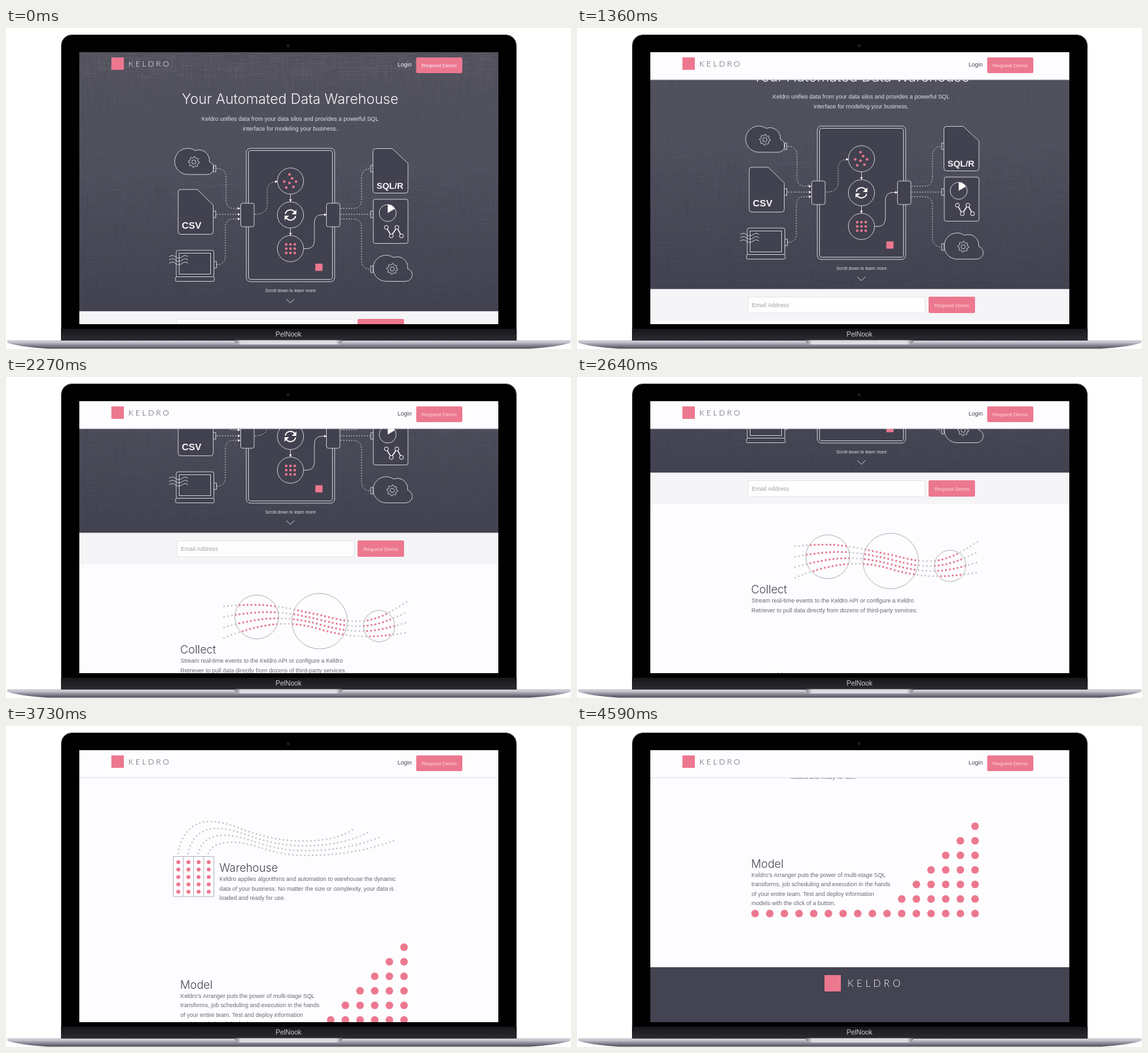
An HTML page that plays this animation: 863 px wide and 491 px high, repeating every 5.59 s.

```html
<!DOCTYPE html>
<html lang="en">
<head>
<meta charset="utf-8">
<title>Keldro scroll tour</title>
<style>
html, body { margin: 0; width: 100%; height: 100%; overflow: hidden; background: #fff; }
svg { display: block; width: 863px; height: 491px; }
text { font-family: "Liberation Sans", Arial, sans-serif; font-size: 8.9px; fill: #6a6a75; }
.light { font-family: Inter, "Liberation Sans", sans-serif; font-weight: 300; }
.brand { font-family: Lato, "Liberation Sans", sans-serif; font-weight: 300; font-size: 12px; letter-spacing: 3.1px; }
.head { font-size: 17px; fill: #42424f; }
.mid { text-anchor: middle; }
.white text { fill: #f5f5f8; }
.white .soft { fill: #dfdfe5; }
.btn text { font-size: 8px; fill: #fbd9e0; text-anchor: middle; }
.btn rect, .pink { fill: #ec788f; }
.art { fill: none; stroke: #d2d2da; stroke-width: .95; }
.dots { stroke-dasharray: 2 2; }
.dark { fill: #41414f; }
.solid { fill: #fff; stroke: none; }
.flow { fill: none; stroke: #c6c5cb; stroke-width: 2.6; stroke-linecap: round; stroke-dasharray: 0 6; }
.flow.hot { stroke: #ec788f; stroke-width: 3; }
#header text { fill: #4a4a56; }
#header .btn text { fill: #fbd9e0; }
#header.clear text { fill: #f5f5f8; }
#header.clear .bar { display: none; }
</style>
</head>
<body>
<svg viewBox="0 0 863 491">
  <defs>
    <clipPath id="screen"><rect x="112" y="37" width="640" height="416"/></clipPath>
    <clipPath id="lenses">
      <circle cx="383" cy="161" r="34"/><circle cx="479" cy="167.5" r="42.5"/><circle cx="570" cy="175" r="24"/>
    </clipPath>
    <linearGradient id="hero" x2="0" y2="1">
      <stop stop-color="#52525f"/><stop offset=".45" stop-color="#4f4f5d"/><stop offset="1" stop-color="#414150"/>
    </linearGradient>
    <linearGradient id="chin" x2="0" y2="1">
      <stop stop-color="#17171b"/><stop offset="1" stop-color="#2b2b31"/>
    </linearGradient>
    <linearGradient id="metal" x2="0" y2="1">
      <stop stop-color="#a0a0ab"/><stop offset=".12" stop-color="#d4d4dc"/>
      <stop offset=".5" stop-color="#9595a2"/><stop offset="1" stop-color="#4a4a55"/>
    </linearGradient>
    <linearGradient id="notch">
      <stop stop-color="#77777f"/><stop offset=".06" stop-color="#dcdce2"/>
      <stop offset=".94" stop-color="#dcdce2"/><stop offset="1" stop-color="#77777f"/>
    </linearGradient>
    <g id="cloud">
      <path class="dark" d="M278 224A20 20 0 1 1 289 187.500A16 16 0 0 1 310.500 204.500A10 10 0 0 1 308 224Z"/>
      <path id="gear"/><circle cx="287" cy="205" r="3.200"/>
    </g>
    <g id="turn">
      <path d="M426.500 284.500A8.200 8.200 0 0 1 441 281.500" fill="none" stroke="#fff" stroke-width="1.700"/>
      <path class="solid" d="M443.500 278V285H436.500Z"/>
    </g>
    <path id="tip" class="solid" d="M0 0l-4-2v4Z"/>
    <g id="streams"></g>
  </defs>

  <!-- laptop -->
  <rect x="84.500" y="10.500" width="695" height="466" rx="16" stroke="#4b4b50"/>
  <path d="M84 460H780V478H84Z" fill="url(#chin)"/>
  <circle cx="431" cy="27" r="2.500" fill="#1b1b20"/>
  <text class="mid" x="431.500" y="472" style="font-size:10.500px;fill:#c9c9cf">PelNook</text>
  <path d="M2 478H862V481.500Q842 488 800 490.500H64Q22 488 2 481.500Z" fill="url(#metal)"/>
  <path d="M349 477.500H514Q513 484 506 484H357Q350 484 349 477.500Z" fill="url(#notch)"/>

  <g clip-path="url(#screen)">
    <rect x="112" y="37" width="640" height="416" fill="#fdfcfe"/>
    <g id="page">
      <rect x="112" y="37" width="640" height="396.500" fill="url(#hero)"/>
      <g fill="none" stroke-width=".7" stroke-dasharray="1 2">
        <path id="weaveTop" stroke="#b09a8c" stroke-opacity=".4"/>
        <path id="weave" stroke="#a9a9bb" stroke-opacity=".2"/>
        <path id="weaveDark" stroke="#30303d" stroke-opacity=".4"/>
      </g>

      <g class="white mid">
        <text class="light" x="434" y="116" style="font-size:21.500px">Your Automated Data Warehouse</text>
        <text class="soft" x="434" y="142">Keldro unifies data from your data silos and provides a powerful SQL</text>
        <text class="soft" x="434" y="156.500">interface for modeling your business.</text>
        <text class="soft" x="434.500" y="404" style="font-size:6.800px">Scroll down to learn more</text>
      </g>

      <g class="art">
        <path d="M428 414.500l6.300 6 6.300-6"/>
        <use href="#cloud"/><use href="#cloud" x="303" y="163.500"/>
        <path d="M316.500 210h4v10h-4zM316.500 280h4v10h-4zM317.500 357h4v10h-4zM557 210h4v10h-4zM557 280h4v10h-4zM557 364h4v10h-4z"/>
        <path class="dark" d="M267 247H292L316.500 271V311.500a4 4 0 0 1-4 4H267a4 4 0 0 1-4-4V251a4 4 0 0 1 4-4Z"/>
        <path class="dark" d="M564.500 184.500H590L614 207V248.500a4 4 0 0 1-4 4H564.500a4 4 0 0 1-4-4V188.500a4 4 0 0 1 4-4Z"/>
        <rect class="dark" x="561" y="262" width="53" height="67.500" rx="3"/>
        <circle cx="583" cy="283" r="13"/><path class="solid" d="M583 283V270A13 13 0 0 1 594 276.500Z"/>
        <path d="M581 305l7.500 13 8.500-13 7 13" stroke="#fff" stroke-width="1.500"/>
        <g class="dark" stroke="#fff">
          <circle cx="581" cy="305" r="3"/><circle cx="588.500" cy="318" r="3"/>
          <circle cx="597" cy="305" r="3"/><circle cx="604" cy="318" r="3"/>
        </g>
        <rect class="dark" x="260" y="340" width="57.500" height="41" rx="3"/>
        <rect class="dark" x="264.500" y="344.500" width="48" height="32"/>
        <rect class="dark" x="259" y="380.500" width="59" height="7" rx="1.500"/>
        <path d="M249 350q5-4 10 0t10 0 9 0m-29 5q5-4 10 0t10 0 9 0m-29 5q5-4 10 0t10 0 9 0"/>

        <rect x="367" y="184" width="135" height="204" rx="6" fill="#474755"/>
        <rect class="dark" x="370.500" y="187.500" width="128" height="197" rx="3"/>
        <g class="dots">
          <path d="M322 215Q336 215 336 229V263Q336 276 349 276H357M322 285H357M322 362Q335 362 335 348V305Q335 292 348 292H357"/>
          <path d="M380 285Q399 285 399 270V250Q399 235 413 235"/>
          <path d="M511 276H530Q543 276 543 262V230Q543 215 557 215M511 285H557M511 292H530Q543 292 543 306V354Q543 369 557 369"/>
        </g>
        <path d="M434.500 254V266M434.500 306V317M455 337.500H459Q471 337.500 471 325V298Q471 285.500 483 285.500H489"/>
        <rect class="dark" x="358.500" y="268" width="20.500" height="36" rx="3"/>
        <rect class="dark" x="489.500" y="268" width="20.500" height="36" rx="3"/>
        <circle cx="434.500" cy="234" r="20"/><circle cx="434.500" cy="286" r="20"/><circle cx="434.500" cy="337.500" r="20"/>
        <use href="#turn"/><use href="#turn" transform="rotate(180 434.500 286)"/>
        <use href="#tip" x="358" y="276"/><use href="#tip" x="358" y="285"/><use href="#tip" x="358" y="292"/>
        <use href="#tip" x="415" y="235"/><use href="#tip" x="490" y="285.500"/>
        <use href="#tip" transform="translate(434.500 266) rotate(90)"/>
        <use href="#tip" transform="translate(434.500 317.500) rotate(90)"/>
      </g>
      <g id="engine" class="pink"></g>
      <rect class="pink" x="472.500" y="360.500" width="11" height="11"/>
      <g class="white" font-weight="700">
        <text x="268.500" y="306.500" style="font-size:14.500px">CSV</text>
        <text x="566" y="246" style="font-size:13.400px">SQL/R</text>
      </g>

      <rect x="112" y="433.500" width="640" height="48" fill="#f5f4f7"/>
      <rect x="261" y="445.500" width="270.500" height="24.500" rx="3" fill="#fefeff" stroke="#e4e3e8"/>
      <text x="267" y="461" style="fill:#a2a2aa">Email Address</text>
      <g class="btn"><rect x="537" y="445" width="71" height="25" rx="2"/><text x="572.500" y="460.500">Request Demo</text></g>

      <g transform="translate(0 401)">
        <use class="flow" href="#streams"/>
        <use class="flow hot" href="#streams" clip-path="url(#lenses)"/>
        <g fill="none" stroke="#b2b1b8">
          <circle cx="383" cy="161" r="33.500"/><circle cx="479" cy="167.500" r="42.500"/><circle cx="570" cy="175" r="24"/>
        </g>
        <text class="light head" x="266" y="217">Collect</text>
        <text x="266.500" y="231">Stream real-time events to the Keldro API or configure a Keldro</text>
        <text x="266.500" y="245.500">Retriever to pull data directly from dozens of third-party services.</text>
      </g>

      <g transform="translate(0 594)">
        <g id="feeds" class="flow"></g>
        <path d="M255.500 199.500H317.500V261H255.500ZM271 199.500V261M286.500 199.500V261M302 199.500V261" fill="none" stroke="#b5b5c0"/>
        <g id="store" class="pink"></g>
        <text class="light head" x="326" y="223">Warehouse</text>
        <text x="326" y="237">Keldro applies algorithms and automation to warehouse the dynamic</text>
        <text x="326" y="251.500">data of your business. No matter the size or complexity, your data is</text>
        <text x="326" y="266">loaded and ready for use.</text>
      </g>

      <g transform="translate(0 779)">
        <g id="stairs" class="pink"></g>
        <text class="light head" x="266" y="216.500">Model</text>
        <text x="266.500" y="230.500">Keldro’s Arranger puts the power of multi-stage SQL</text>
        <text x="266.500" y="245">transforms, job scheduling and execution in the hands</text>
        <text x="266.500" y="259.500">of your entire team. Test and deploy information</text>
        <text x="266.500" y="274">models with the click of a button.</text>
        <rect x="112" y="369" width="640" height="90" fill="#434351"/>
        <rect class="pink" x="378" y="381" width="25" height="25"/>
        <g class="white"><text class="brand" x="413" y="399" style="font-size:15px;letter-spacing:4.600px">KELDRO</text></g>
      </g>
    </g>

    <g id="header" class="clear">
      <g class="bar"><rect x="112" y="37" width="640" height="42" fill="#fdfcfe"/><path d="M112 79H752" stroke="#dcdbe0"/></g>
      <rect class="pink" x="161" y="45" width="19" height="19"/>
      <text class="brand" x="187" y="59">KELDRO</text>
      <text x="598" y="59">Login</text>
      <g class="btn"><rect x="626.500" y="45" width="70.500" height="24" rx="2"/><text x="661.500" y="60">Request Demo</text></g>
    </g>
  </g>
</svg>
<script>
const el = id => document.getElementById(id);
const range = n => [...Array(n).keys()];
const dot = (x, y, r) => `<circle cx="${x}" cy="${y}" r="${r}"/>`;
const grid = (cols, rows, f) => range(cols).flatMap(i => range(rows).map(j => f(i, j))).join('');

// Four curves blended evenly between a first and a last one
const blend = (first, last) => range(4).map(i => {
  const p = first.map((a, k) => (a + (last[k] - a) * i / 3).toFixed(1));
  return `<path d="M${p.slice(0, 2)}C${p.slice(2)}"/>`;
}).join('');

el('gear').setAttribute('d', 'M' + range(32).map(k => {
  const a = k * Math.PI / 16, r = k % 4 < 2 ? 8.3 : 6.3;
  return `${(287 + r * Math.cos(a)).toFixed(2)} ${(205 + r * Math.sin(a)).toFixed(2)}`;
}).join('L') + 'Z');

el('engine').innerHTML =
  [[433, 224], [425, 235], [437, 230], [443, 235], [433, 237], [428, 244], [439, 243]].map(p => dot(...p, 2)).join('') +
  grid(3, 3, (i, j) => dot(428 + 6.5 * i, 331 + 6.5 * j, 2));
el('store').innerHTML = grid(4, 5, (i, j) => dot(263.2 + 15.5 * i, 208.3 + 11.3 * j, 3));
el('stairs').innerHTML = grid(16, 7, (i, j) =>
  j < Math.max(1, i - 8) ? dot(272 + 22.4 * i, 286.8 - 22.25 * j, 5.8) : '');

el('streams').innerHTML = blend(
  [333, 145, 400, 138, 420, 146, 480, 158, 540, 174, 560, 172, 612, 138],
  [333, 193, 385, 172, 430, 164, 480, 180, 530, 194, 560, 193, 612, 185]);
el('feeds').innerHTML = blend(
  [263, 195, 268, 160, 290, 146, 311, 146, 350, 146, 380, 176, 455, 176, 500, 176, 525, 163, 531, 157],
  [309, 195, 312, 186, 322, 179, 340, 178, 380, 176, 400, 198, 458, 198, 520, 198, 565, 186, 596, 174]);

// Woven backdrop: short threads gathered in horizontal bands
let seed = 7;
const rnd = () => (seed = seed * 16807 % 2147483647) / 2147483647;
function weave(id, count, bands, spread) {
  el(id).setAttribute('d', range(count).map(() => {
    const band = bands[Math.floor(rnd() * bands.length)];
    const x = 112 + 3 * Math.floor(rnd() * 213);
    const y = band + 3 * Math.round((rnd() + rnd() - 1) * spread / 3);
    const len = Math.round(6 + rnd() * 24);
    const down = rnd() < .5;
    return y < 37 || y + (down ? len : 0) > 432 ? '' : `M${x} ${y + .5}${down ? 'v' : 'h'}${len}`;
  }).join(''));
}
weave('weaveTop', 500, [39, 51, 63], 15);
weave('weave', 900, [60, 235, 260, 375], 60);
weave('weaveDark', 1300, [110, 235, 285, 375], 70);

// Scroll keys: [step, offset, speed per step]
const keys = [[0, 0, 2.5], [17, 96, 7.6], [28, 195, 10.4], [45, 401, 12.9], [60, 594, 12.1], [79, 779, 4]];
const STEP = 3590 / 79, LOOP = 5590;

function scrollAt(n) {
  const i = Math.max(1, keys.findIndex(k => k[0] >= n));
  const [n0, y0, v0] = keys[i - 1], [n1, y1, v1] = keys[i];
  const d = n1 - n0, u = (n - n0) / d, w = 1 - u;
  return w * w * (1 + 2 * u) * y0 + u * u * (1 + 2 * w) * y1 + d * u * w * (w * v0 - u * v1);
}

const start = performance.now();
function draw(now) {
  const t = Math.max(0, now - start) % LOOP;
  const n = Math.min(79, Math.max(0, Math.floor((t - 992) / STEP)));
  const y = Math.round(scrollAt(n));
  el('page').setAttribute('transform', `translate(0 ${-y})`);
  el('header').classList.toggle('clear', y < 20);
  requestAnimationFrame(draw);
}
draw(start);
</script>
</body>
</html>
```
